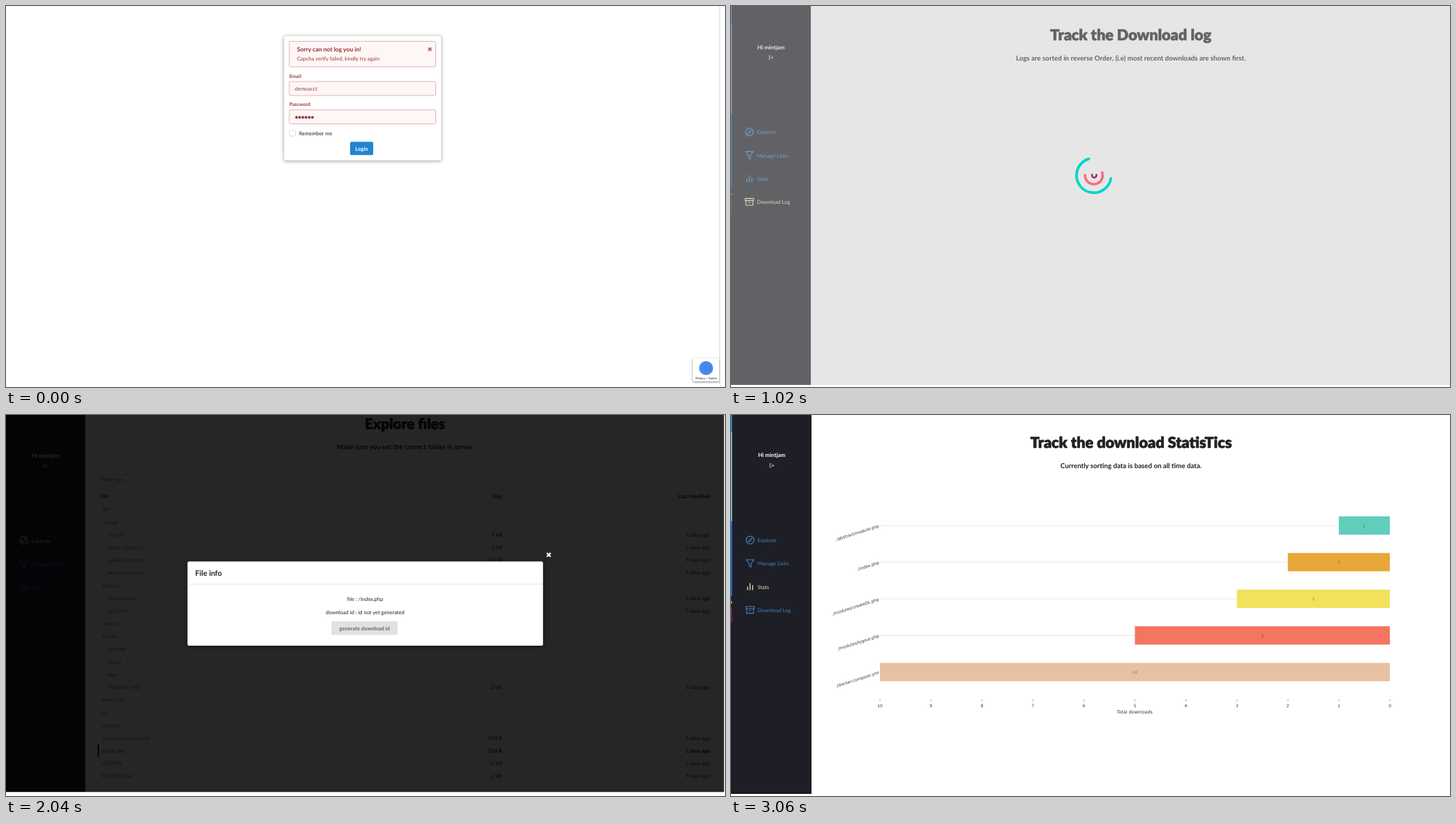
Recreate the animation shown at these times as an HTML page with a canvas. Size 1028x545 px, loop 3570 ms.

```html
<!DOCTYPE html>
<html lang="en">
<head>
<meta charset="utf-8">
<title>File sharing tour</title>
<style>
html, body { margin: 0; width: 100%; height: 100%; overflow: hidden; background: #fff; }
canvas { display: block; }
</style>
</head>
<body>
<canvas id="stage" width="1028" height="545"></canvas>
<script>
const c = document.getElementById('stage').getContext('2d');
const HOLD = 510;
const INK = '#212121', LINK = '#4183c4', SIDE = '#1e1e26', WHEAT = '#f5deb3';
const LATO = 'Lato, sans-serif', DEJAVU = '"DejaVu Sans", sans-serif';

// y is the middle of the capitals
function text(s, x, y, { size = 7.5, weight = 400, color = INK, align = 'left', font = LATO } = {}) {
  c.font = `${weight} ${size}px ${font}`;
  c.textAlign = align;
  c.fillStyle = color;
  c.fillText(s, x, y + size * 0.36);
}

function rect(x, y, w, h, color) {
  c.fillStyle = color;
  c.fillRect(x, y, w, h);
}

function box(x, y, w, h, r, fill, stroke, width = 1) {
  c.beginPath();
  c.roundRect(x, y, w, h, r);
  if (fill) { c.fillStyle = fill; c.fill(); }
  if (stroke) { c.strokeStyle = stroke; c.lineWidth = width; c.stroke(); }
}

function shadowBox(x, y, w, h, r, blur, color) {
  c.save();
  c.shadowColor = color;
  c.shadowBlur = blur;
  c.shadowOffsetY = 1;
  box(x, y, w, h, r, '#fff');
  c.restore();
}

function path(points, color, width = 1, close = false) {
  c.beginPath();
  points.forEach(([x, y]) => c.lineTo(x, y));
  if (close) c.closePath();
  c.strokeStyle = color;
  c.lineWidth = width;
  c.stroke();
}

function disc(x, y, r, color) {
  c.beginPath();
  c.arc(x, y, r, 0, 7);
  c.fillStyle = color;
  c.fill();
}

function arc(x, y, r, from, to, color, width) {
  c.beginPath();
  c.arc(x, y, r, from * Math.PI / 180, to * Math.PI / 180);
  c.strokeStyle = color;
  c.lineWidth = width;
  c.stroke();
}

function cross(x, y, r, color) {
  path([[x - r, y - r], [x + r, y + r]], color, 2.2);
  path([[x + r, y - r], [x - r, y + r]], color, 2.2);
}

function title(s, x, y, sub, subX = x, size = 21.6) {
  text(s, x, y, { size, weight: 900, align: 'center' });
  c.strokeStyle = INK;
  c.lineWidth = 0.7;
  c.strokeText(s, x, y + size * 0.36);
  text(sub, subX, y + 33.3, { size: 9.7, weight: 700, align: 'center' });
}

function button(s, x, y, w, h, fill, color, size = 7.5) {
  box(x, y, w, h, 2, fill);
  text(s, x + w / 2, y + h / 2 + 0.2, { size, weight: 700, color, align: 'center' });
}

const icons = [
  col => {
    arc(0, 0, 5.6, 0, 360, col, 1.2);
    path([[2.8, -2.8], [1, 1], [-2.8, 2.8], [-1, -1]], col, 1, true);
  },
  col => path([[-5.5, -5.2], [5.5, -5.2], [1.4, 0.2], [1.4, 5.4], [-1.4, 3.6], [-1.4, 0.2]], col, 1.1, true),
  col => [[-3.6, 0], [0, -5], [3.6, -2]].forEach(([x, top]) => path([[x, 5], [x, top]], col, 1.3)),
  col => {
    path([[-6, -4.8], [6, -4.8], [6, -1.8], [-6, -1.8]], col, 1.1, true);
    path([[-5, -1.8], [-5, 4.8], [5, 4.8], [5, -1.8]], col, 1.1);
    path([[-1.8, 0.8], [1.8, 0.8]], col, 1.1);
  }
];

function sidebar(dx, dy, active, count = 4, bottom = 545) {
  rect(0, 0, 113.4 + dx, bottom, SIDE);
  c.save();
  c.translate(dx, dy);
  text('Hi mintjam', 56.5, 60.7, { size: 8, weight: 700, color: '#fff', align: 'center' });
  path([[56, 72.8], [54, 72.8], [54, 78], [56, 78]], '#ddd', 0.8);
  path([[55.8, 75.4], [59.3, 75.4]], '#ddd', 0.8);
  path([[57.8, 73.8], [59.5, 75.4], [57.8, 77]], '#ddd', 0.8);
  ['Explorer', 'Manage Links', 'Stats', 'Download Log'].slice(0, count).forEach((label, i) => {
    const y = 182.2 + i * 33.3, col = i === active ? WHEAT : LINK;
    text(label, 36.3, y + 0.2, { color: col });
    c.save();
    c.translate(25.6, y - 0.2);
    icons[i](col);
    c.restore();
  });
  c.restore();
}

// Sliver of the neighbouring window along the left edge
function sliver(w, dy) {
  rect(0, 0, w, 26 + dy, '#1a9cf0');
  rect(0, 26 + dy, w, 128, '#8fd0f5');
  rect(0, 154 + dy, w, 106, '#0a7cff');
  rect(0, 260 + dy, w, 18, '#25252c');
  rect(0, 268 + dy, w, 3, '#b0b0b0');
  rect(0, 278 + dy, w, 20, '#6b2a4c');
  rect(0, 298 + dy, w, 244 - dy, '#17171d');
}

function badge(x, y, w, soft) {
  shadowBox(x, y, w, 33, 1, 3, 'rgba(0,0,0,.5)');
  disc(x + 19, y + 14, 10, '#4a86e8');
  text('Privacy – Terms', x + 19, y + 28.3,
    { size: 4.2, weight: soft ? 400 : 500, color: '#444', align: 'center', font: 'Roboto, sans-serif' });
}

// Rows read "name|size|age"; a leading ">" indents
function fileTable(rows, y, step, right, lines, bold) {
  rows.forEach((row, i) => {
    const [name, size, age] = row.split('|');
    const cy = y + i * step, deep = name[0] === '>';
    const weight = i === bold ? 700 : 400;
    if (lines) rect(131, cy - 10.2, 872, 0.7, '#e4e4e4');
    text(deep ? name.slice(1) : name, deep ? 145.5 : 137, cy, { color: LINK, weight });
    if (!size) return;
    text(size, 709, cy, { align: 'right', weight });
    text(age, right, cy, { align: 'right', weight });
  });
}

function fileHead(y, right) {
  text('File', 135, y, { weight: 700 });
  text('Size', 709, y, { weight: 700, align: 'right' });
  text('Last Modified', right, y, { weight: 700, align: 'right' });
}

function field(label, y) {
  text(label, 405, y, { size: 7, weight: 700, color: '#9f3a38' });
  box(405, y + 7.8, 209.5, 20, 2, '#fff6f6', '#e0b4b4');
}

function login() {
  rect(1020, 0, 1, 541, '#d8d8d8');
  shadowBox(397.3, 42.5, 225, 178.5, 2, 5, 'rgba(0,0,0,.4)');
  box(397.3, 42.5, 225, 178.5, 2, '#fff', '#d4d4d5', 0.7);
  box(405, 50.5, 209.5, 36.5, 2, '#fff6f6', '#e0b4b4');
  text('Sorry can not log you in!', 416, 62.2, { size: 8.57, weight: 700, color: '#912d2b' });
  text('Capcha verify failed, kindly try again', 416, 75, { color: '#9f3a38' });
  cross(606, 61.8, 2.1, '#b56b69');
  field('Email', 100.2);
  text('demoacct', 413, 118.2, { color: '#9f3a38' });
  field('Password', 140.8);
  for (let i = 0; i < 6; i++) disc(415.4 + i * 4.55, 159.3, 1.95, '#9f3a38');
  box(405.3, 177.7, 8.5, 8.5, 1.5, '#fff', '#d4d4d5', 0.8);
  text('Remember me', 419, 182);
  button('Login', 492, 194.3, 33, 19, '#2185d0', '#fff');
  badge(982, 504, 38);
  rect(1021, 495, 7, 50, '#fff');
}

const FILES = ['.git', '.mysql', 'abstract', '>module.php|960 B|9 days ago', '>utils.php|2 kB|4 hours ago',
  'classes', 'Docker', 'interfaces', 'lib', 'modules', '>createDL.php|2 kB|9 days ago',
  '>download.php|6 kB|9 days ago', '>downloadLogs.php|3 kB|5 hours ago', '>fileOperation.php|2 kB|9 days ago',
  '>login.php|4 kB|4 hours ago', '>logout.php|385 B|9 days ago', '>managelinks.php|3 kB|9 days ago',
  '>stats.php|2 kB|9 days ago', 'docker-compose.yml|960 B|9 days ago', 'index.php|934 B|4 hours ago',
  'LICENSE|11 kB|9 days ago'];

function explorer() {
  sidebar(0, 0, 0);
  title('Explore files', 567.3, 42.3, 'Make sure you set the correct folder in server');
  box(131.3, 116.8, 870, 12.5, 0, '#fff', '#ccc', 0.9);
  text('Filter files', 135, 123, { color: '#757575', font: DEJAVU });
  fileHead(147.2, 999.5);
  fileTable(FILES, 166, 18.7, 999.5, true);
  c.setLineDash([1, 1]);
  box(136.5, 516.5, 33, 9.5, 0, null, LINK, 0.8);
  c.setLineDash([]);
  rect(1020.3, 0, 6.5, 545, '#d3d3d5');
  rect(1021.6, 2, 4, 425, '#7b7b7e');
  rect(0, 0, 1027, 1.1, SIDE);
}

function downloadLog() {
  sidebar(0.7, -1.7, 3, 4, 542);
  sliver(0.9, 0);
  title('Track the Download log', 571.7, 41,
    'Logs are sorted in reverse Order, (i.e) most recent downloads are shown first.');
  rect(0, 0, 1028, 542, 'rgba(195,195,195,.413)');
  c.lineCap = 'round';
  arc(518.8, 242.3, 24.8, 10, 253, '#00d5cc', 3.8);
  arc(518.8, 242.3, 12.6, -20, 182, '#f2727f', 3.6);
  arc(519.3, 242.2, 3.2, -15, 195, '#a8285f', 2.6);
  c.lineCap = 'butt';
}

const LINKS = ['a99f15eb ./modules/download.php', '41b61714 ./classes/response.php',
  'e4f3224a ./Docker/mysql/dbinit/tables.sql', 'b6d9c84c ./lib/ReCaptcha/RequestMethod/Curl.php',
  'b0a4efbf ./lib/ReCaptcha/RequestMethod/Post.php', '788dbddf ./lib/ReCaptcha/RequestParameters.php',
  'fb61fbfb ./lib/ReCaptcha/RequestMethod/SocketPost.php', '8cc83129 ./.mysql/client-cert.pem',
  '3fc8b8ad ./modules/managelinks.php', 'b9c1a645 ./.mysql/ca.pem'];

function manageLinks() {
  sidebar(2.1, -1.7, 1, 4, 542);
  rect(0, 538, 115.5, 4, '#17171d');
  sliver(1.9, 0);
  title('Browse & Manage links', 572.2, 41, 'Enable or disable links here');
  box(133.6, 114.6, 877.4, 351.2, 2, '#f9fafb', '#dedfe0', 0.9);
  rect(134, 140, 876.6, 296, '#fff');
  text('downloadId', 139.5, 128, { weight: 700 });
  text('Path', 305.5, 128, { weight: 700 });
  text('Status', 968, 128, { weight: 700 });
  LINKS.forEach((row, i) => {
    const [id, file] = row.split(' '), y = 155.8 + i * 29.6, ty = 154 + i * 29.57;
    rect(134, 139.8 + i * 29.6, 876.6, 0.7, '#e2e2e3');
    text(id, 139.5, y, { color: LINK });
    text(file, 305.5, y);
    box(968, ty - 7.5, 30.3, 15, 7.5, '#000');
    disc(990.7, ty, 6.9, '#fff');
  });
  rect(134, 435.8, 876.6, 0.7, '#dedfe0');
  button('prev', 139.5, 442.5, 34.5, 17.3, '#e0e1e2', '#666', 7);
  button('next', 970.3, 442.5, 34.5, 17.3, '#e0e1e2', '#666', 7);
}

const OLD = '|5 days ago';
const OLD_FILES = ['.git', '.mysql', '>ca.pem|1 kB', '>client-cert.pem|1 kB', '>public_key.pem|452 B',
  '>server-cert.pem|1 kB', 'abstract', '>module.php|960 B', '>utils.php|2 kB', 'classes', 'Docker',
  '>adminer', '>mysql', '>php', '>README.MD|2 kB', 'interfaces', 'lib', 'modules',
  'docker-compose.yml|960 B', 'index.php|514 B', 'LICENSE|11 kB', 'README.md|2 kB']
  .map(row => row.includes('|') ? row + OLD : row);

function fileInfo() {
  sidebar(0, -2.6, 0, 3, 539);
  title('Explore files', 570.3, 12.5, 'Make sure you set the correct folder in server', 570.3, 20.7);
  box(131.3, 85.5, 875.5, 13, 2, null, '#ddd', 0.8);
  text('Filter files', 135.5, 92.3, { color: '#666' });
  fileHead(116, 1006.5);
  fileTable(OLD_FILES, 134.7, 18.19, 1007, false, 19);
  rect(131, 471, 2, 17.5, '#000');
  rect(0, 0, 1026.6, 539.3, 'rgba(0,0,0,.85)');
  shadowBox(259.5, 209.5, 508.3, 120.5, 2, 5, 'rgba(0,0,0,.6)');
  text('File info', 270.5, 226, { size: 10.7, weight: 700 });
  rect(259.5, 241.6, 508.3, 0.8, '#dcdcdd');
  text('file : /index.php', 513.5, 263.5, { align: 'center' });
  text('download Id : id not yet generated', 513.5, 282, { align: 'center' });
  button('generate download id', 465.3, 295, 94.6, 19.4, '#e0e1e2', '#666');
  cross(776, 200, 2.7, '#fff');
}

function folder(x, y, tilt, fill) {
  c.save();
  c.translate(x, y);
  c.rotate(tilt);
  c.beginPath();
  [[0, 24], [0, 1.5], [1.5, 0], [11, 0], [12.5, 2], [30, 2], [31, 3], [31, 24]].forEach(p => c.lineTo(...p));
  c.closePath();
  c.fillStyle = fill;
  c.fill();
  c.strokeStyle = '#d6bf8c';
  c.lineWidth = 0.6;
  c.stroke();
  c.restore();
}

function download() {
  folder(503, 12.8, 0.08, '#e6d2a2');
  folder(499.5, 16, 0.04, '#ead7aa');
  folder(495.2, 20, 0, '#efdfb9');
  text('logout.php', 496.5, 105.2);
  text('385 bytes', 496.5, 116);
  box(428.8, 161.8, 170.5, 37.3, 5, '#fff', '#7090ec', 1.2);
  text('Checking Captcha..', 514, 181, { size: 13.4, color: '#2f62e8', align: 'center' });
  badge(991, 503, 38, true);
}

const BARS = [
  ['./abstract/module.php', 1, '#61cdbb', '#3a7b70'],
  ['./index.php', 2, '#e8a838', '#8b6522'],
  ['./modules/createDL.php', 3, '#f1e15b', '#918737'],
  ['./modules/logout.php', 5, '#f47560', '#92463a'],
  ['./docker-compose.yml', 10, '#e8c1a0', '#8b7460']
];

function stats() {
  sidebar(1.7, -3.1, 2, 4, 542);
  rect(0, 540, 115, 2, '#17171d');
  sliver(1.5, -1.5);
  title('Track the download StatisTics', 572, 39, 'Currently sorting data is based on all time data.');
  const right = 942, unit = 72.9, font = DEJAVU, center = 'center', color = '#333';
  BARS.forEach(([label, n, fill, dark], i) => {
    const y = 158.2 + i * 52.4, w = n * unit;
    rect(213, y - 0.3, 729, 0.7, '#dcdcdc');
    rect(right - w, y - 13.2, w, 26.2, fill);
    text(n, right - w / 2, y + 0.2, { size: 5.9, color: dark, align: center, font });
    c.save();
    c.translate(211.5, y + 0.3);
    c.rotate(-0.31);
    text(label, 0, 0, { size: 5.9, color, align: 'right', font });
    c.restore();
  });
  for (let n = 0; n <= 10; n++) {
    const x = right - n * unit;
    rect(x - 0.3, 407, 0.7, 2.6, '#777');
    text(n, x, 416, { size: 5.9, color, align: center, font });
  }
  text('Total downloads', 577.3, 424.6, { size: 6.4, color, align: center, font });
}

const scenes = [login, explorer, downloadLog, manageLinks, fileInfo, download, stats];
const start = performance.now();

function draw() {
  const t = Math.max(0, performance.now() - start) % (HOLD * scenes.length);
  c.textRendering = 'geometricPrecision';
  rect(0, 0, 1028, 545, '#fff');
  scenes[Math.floor(t / HOLD)]();
  requestAnimationFrame(draw);
}
draw();
</script>
</body>
</html>
```
